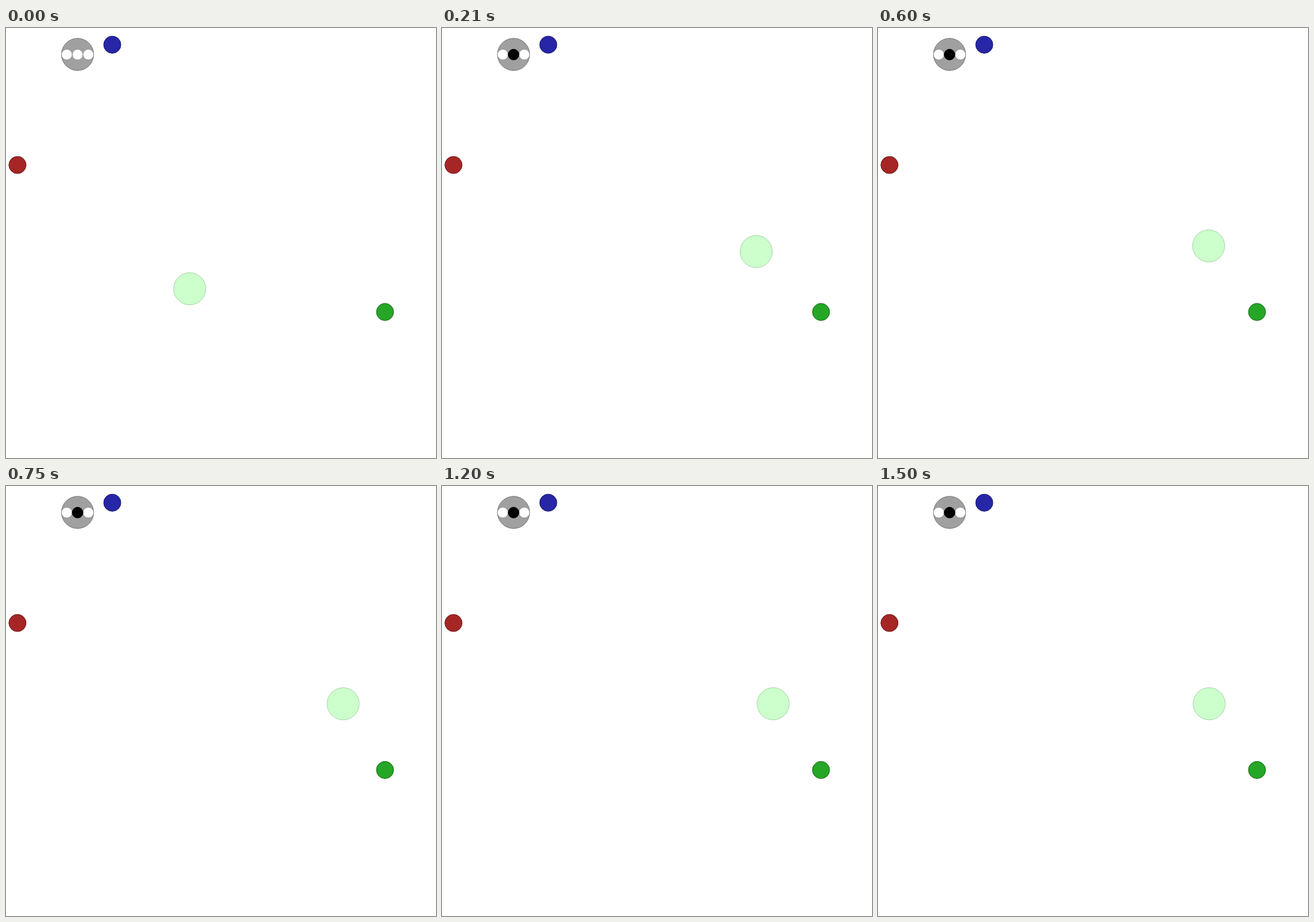
An HTML page that plays this animation: 700 by 700 pixels, repeating every 1.53 s.

```html
<!DOCTYPE html>
<html lang="en">
<head>
<meta charset="utf-8">
<title>Speaker and listener</title>
<style>
html, body { margin: 0; width: 100%; height: 100%; overflow: hidden; background: #fff; }
svg { display: block; width: 100vw; height: 100vh; }
</style>
</head>
<body>
<svg viewBox="0 0 700 700">
  <g stroke-width="1">
    <circle cx="18.7" cy="223" r="14" fill="#a62626" stroke="#6c1919"/>
    <circle cx="617" cy="462.3" r="14" fill="#26a626" stroke="#196c19"/>
    <circle cx="173" cy="27.2" r="14" fill="#2626a6" stroke="#19196c"/>
    <circle cx="116.5" cy="43" r="26.2" fill="#a0a0a0" stroke="#747474"/>
    <circle id="listener" r="26.2" fill="#ccffcc" stroke="#a9d3a9"/>
    <g fill="#fff" stroke="#909090">
      <circle cx="99" cy="43.3" r="8.75"/>
      <circle cx="134" cy="43.3" r="8.75"/>
      <circle id="word" cx="116.5" cy="43.3" r="8.75"/>
    </g>
  </g>
</svg>
<script>
const STEP = 30, STEPS = 51;
const PUSH = 17.5, KEEP = 0.75;
const listener = document.getElementById('listener');
const word = document.getElementById('word');

// One push per step: up once, right five times, then left and right around the goal.
function action(k) {
  if (k === 1) return [0, -1];
  if (k <= 6) return [1, 0];
  if (k === 7) return [-1, 0];
  return [k % 2 ? 1 : -1, 0];
}

// Damped motion from rest.
function simulate() {
  let x = 299.1, y = 424.5, vx = 0, vy = 0;
  const path = [[x, y]];
  for (let k = 1; k < STEPS; k++) {
    const [ax, ay] = action(k);
    vx = vx * KEEP + ax * PUSH;
    vy = vy * KEEP + ay * PUSH;
    path.push([x += vx, y += vy]);
  }
  return path;
}

const path = simulate();

function draw(time) {
  const k = Math.floor(time / STEP) % STEPS;
  listener.setAttribute('cx', path[k][0]);
  listener.setAttribute('cy', path[k][1]);
  word.setAttribute('fill', k ? '#000' : '#fff');
  word.setAttribute('stroke', k ? '#000' : '#909090');
}

let start = null;
function tick(now) {
  if (start === null) start = now;
  draw(Math.max(0, now - start));
  requestAnimationFrame(tick);
}
draw(0);
requestAnimationFrame(tick);
</script>
</body>
</html>
```
